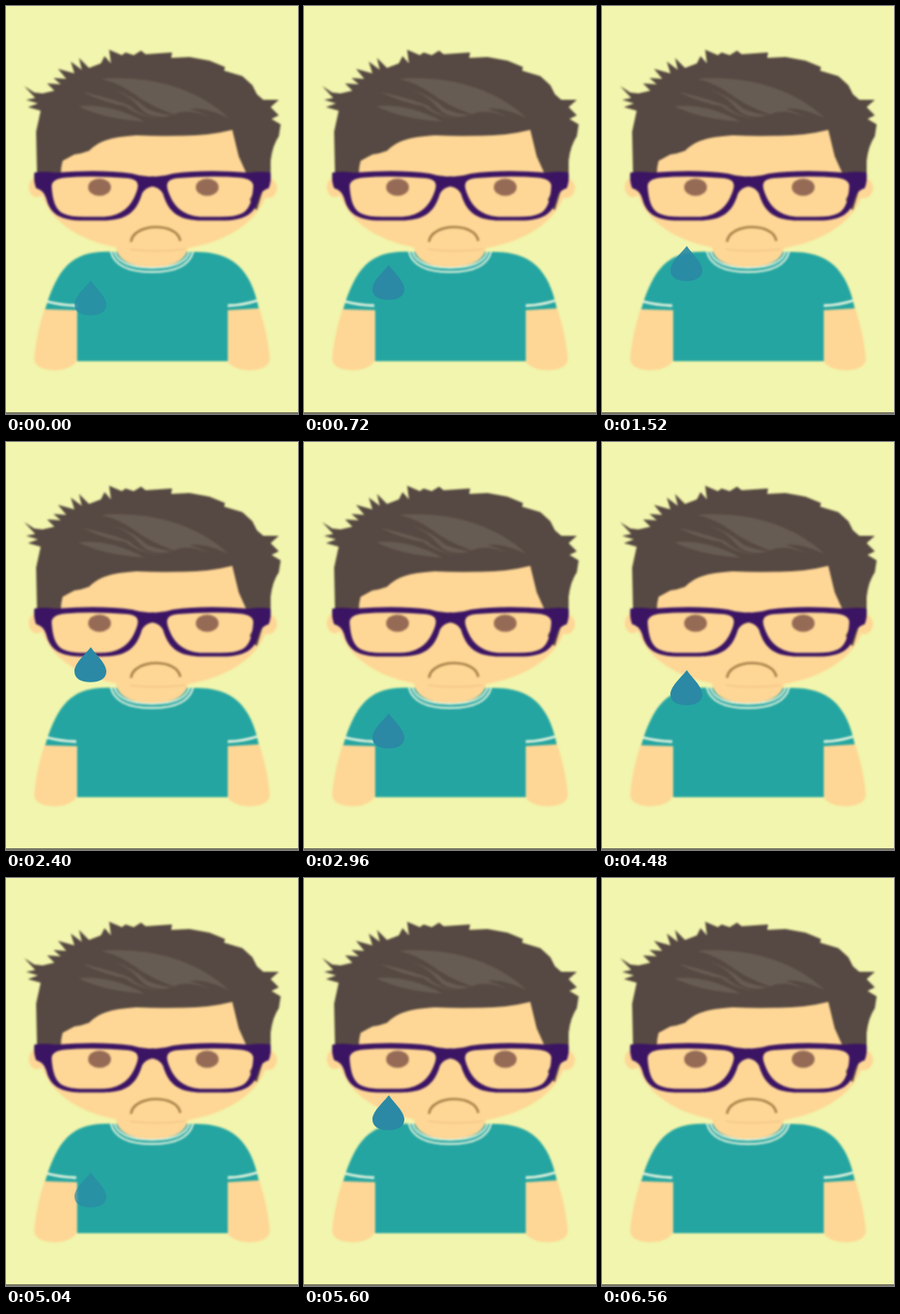
Write an HTML page that moves like this. It is 320 px wide and 448 px high and loops after 7200 ms.

```html
<!DOCTYPE html>
<html lang="en">
<head>
<meta charset="utf-8">
<title>Sad boy with a tear</title>
<style>
  html, body { margin: 0; width: 100%; height: 100%; overflow: hidden; background: #f2f5ad; }
  svg { display: block; width: 100vw; height: 100vh; }
  #boy { filter: blur(1px); }
</style>
</head>
<body>
<svg viewBox="0 0 320 448">
  <defs>
    <g id="arm" fill="#fed695">
      <path d="M43 331C37 348 32 370 31 388Q32 399 52 400Q71 400 78 389V328Z"/>
    </g>
    <g id="lens" fill="#3b1463">
      <path fill-rule="evenodd" d="M31 183Q40 181 55 183Q103 179 138 184Q150 188 161 187V198Q153 199 149 206C143 227 131 235.500 106 235.500H84C59 235.500 48 228 44 211Q41 202 33 200Q30 192 31 183Z
        M50 198C51 213 54 224 63 228Q70 231.500 86 231.500H104C126 231.500 138 221 144 201Q147 190 133 189Q95 186 64 188.500Q50 190 50 198Z"/>
    </g>
  </defs>
  <rect width="320" height="448" fill="#f2f5ad"/>
  <g id="boy">
    <g fill="#fed695">
      <ellipse cx="34" cy="199" rx="9" ry="11"/>
      <ellipse cx="287" cy="200" rx="10" ry="11"/>
      <path d="M36 150C60 120 265 120 287 150L288 195C282 244 223 269 163 269C99 269 43 244 37 195Z"/>
    </g>
    <use href="#arm"/>
    <use href="#arm" transform="translate(320) scale(-1 1)"/>
    <path d="M116 270C74 268 57 286 43 333L78 334V390H243V334L277 332C268 287 246 269 205 270Z" fill="#24a5a1"/>
    <path d="M120 262Q121 286 160 287Q199 286 200 262Z" fill="#fed695"/>
    <g fill="none" stroke="#e9f5df" stroke-width="2">
      <path d="M115 270Q121 292 160 292Q199 292 205 270"/>
      <path d="M119 270Q124 287 160 287.500Q196 287 201 270"/>
      <path d="M45 324.500Q60 328.500 77 329M243 329Q260 328.500 275 323.500" stroke-width="2.800"/>
    </g>
    <path d="M136 267Q163 271 196 267" fill="none" stroke="#edc083" stroke-width="1.2"/>
    <path d="M137 259C139 238 188 237 191 258" fill="none" stroke="#a58048" stroke-width="2.6"/>

    <path d="M282 184L267 213L270 216L269 220L275 224L281 204Z" fill="#564842"/>
    <path fill="#564842" d="M34 185L33 138L38 115L24 111L35 107L22 103L32 101L20 88L31 95L40 96L53 93L45 85L60 86L52 79L66 80L57 69L75 74L71 61L83 70L80 57L91 68L104 63L108 55L115 63L113 48L127 54L131 51L140 54L148 49L153 53L182 51L181 57L201 56L223 60L240 67L239 71L259 77L270 87L275 97L282 103L299 103L290 111L299 120L291 124L301 130L299 143Q292 153 290 170V185H264L255 165L248 136Q220 143 190 142.500Q165 143 143 142C113 144 101 149 91 159Q83 162 75 163L62 170Q60 177 60 185Z"/>
    <g fill="#675c53">
      <path d="M104 80C160 76 210 91 244 123Q217 110 201 113Q215 117 222 122Q199 112 184 119Q158 110 141 97Q125 85 104 80Z"/>
      <path d="M83 94Q117 102 135 109Q151 124 180 125Q148 124 131 110Q107 106 83 94Z"/>
      <path d="M115 91Q139 98 155 113Q170 119 183 120Q158 126 146 111Q135 98 115 91Z"/>
      <path d="M79 110Q115 107 152 127Q107 124 79 110Z"/>
    </g>

    <g fill="#966b56">
      <ellipse cx="102.500" cy="199" rx="12.500" ry="9.500"/>
      <ellipse cx="220.500" cy="199" rx="12.500" ry="9.500"/>
    </g>
    <use href="#lens"/>
    <use href="#lens" transform="translate(321) scale(-1 1)"/>
  </g>
  <path id="tear" d="M0 -.5C3 5 17 17 17 26C17 34 10 38 -.5 38C-11 38 -18 34 -18 26C-18 17 -4 5 0 -.5Z" fill="#2b89a5" style="filter: blur(.5px)"/>
  <rect y="446" width="320" height="2" fill="#777864"/>
</svg>
<script>
  const LOOP = 7200, STEP = 80, TOP = 225, SPEED = 0.13;
  const FADE_IN = 80, FADE_OUT = 350;
  const tear = document.getElementById("tear");

  // Each tear: when it appears, starts falling and is gone (ms).
  const tears = [
    [-600, -590, 240], [240, 260, 1200], [1200, 1220, 1840],
    [1960, 2395, 3440], [3440, 3585, 4270], [4270, 4280, 5280],
    [5500, 5492, 6560]
  ];

  const clamp = v => Math.max(0, Math.min(1, v));

  function draw(time) {
    const t = Math.floor((time % LOOP) / STEP) * STEP;
    const active = tears.find(([appear, , gone]) => t >= appear && t < gone);
    if (!active) {
      tear.setAttribute("opacity", 0);
      return;
    }
    const [appear, fall, gone] = active;
    const y = TOP + SPEED * Math.max(0, t - fall);
    const opacity = Math.min(clamp((t - appear) / FADE_IN), clamp((gone - t) / FADE_OUT));
    tear.setAttribute("transform", `translate(93 ${y.toFixed(2)})`);
    tear.setAttribute("opacity", opacity.toFixed(3));
  }

  const start = performance.now();
  function tick() {
    draw(performance.now() - start);
    requestAnimationFrame(tick);
  }
  tick();
</script>
</body>
</html>
```
